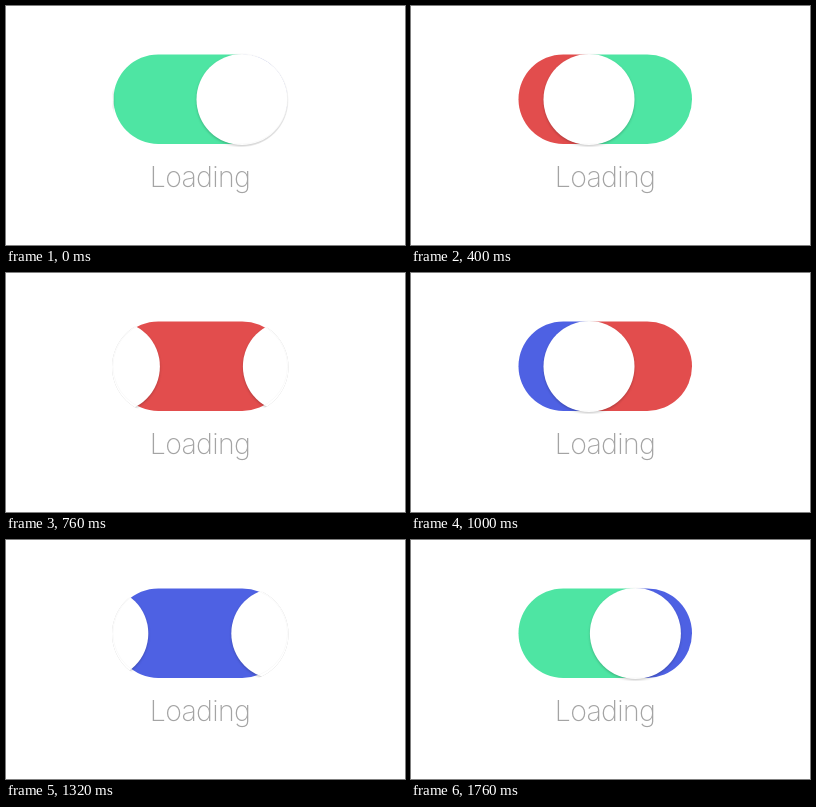
An HTML page with a canvas that plays this animation: 399x239 px, repeating every 1.8 s.

```html
<!DOCTYPE html>
<html lang="en">
<head>
<meta charset="utf-8">
<title>Loading</title>
<style>
  html, body { margin: 0; width: 100%; height: 100%; overflow: hidden; background: #fff; }
  canvas, svg { position: absolute; left: 0; top: 0; width: 399px; height: 239px; }
  text {
    font: 200 28.5px Inter, "Liberation Sans", sans-serif;
    letter-spacing: -0.7px; fill: #a4a4a4; text-anchor: middle;
  }
</style>
</head>
<body>
<canvas id="stage" width="399" height="239"></canvas>
<svg viewBox="0 0 399 239"><text x="194" y="181.4">Loading</text></svg>
<script>
const ctx = document.getElementById('stage').getContext('2d');
const COLORS = ['#4ee5a3', '#e24d4d', '#4e61e3'];
const LOOP = 1800, STEP = 40, TURN = 600, SPACING = 174;
const LEFT = 107.5, WIDTH = 173.5, TOP = 48.4, HEIGHT = 89.5;
const START = 236, KNOB_Y = 93.5, RADIUS = 45.5;

function pill(x, y, w, h) {
  ctx.beginPath();
  ctx.roundRect(x, y, w, h, Math.min(w, h) / 2);
}

function circle(x) {
  ctx.beginPath();
  ctx.arc(x, KNOB_Y, RADIUS, 0, Math.PI * 2);
}

function knob(x) {
  ctx.save();
  ctx.shadowColor = 'rgba(0,0,0,0.22)';
  ctx.shadowBlur = 2.5;
  ctx.shadowOffsetY = 1.3;
  ctx.fillStyle = '#fff';
  circle(x);
  ctx.fill();
  ctx.restore();

  // faint rim of the track where the knob covers it
  ctx.save();
  circle(x);
  ctx.clip();
  pill(LEFT - 0.5, TOP, WIDTH + 1, HEIGHT);
  ctx.strokeStyle = 'rgba(0,0,0,0.025)';
  ctx.stroke();
  ctx.restore();
}

function draw(time) {
  const t = Math.floor((time % LOOP) / STEP) * STEP;
  // each knob parts two colours on a strip sliding to the right
  const turn = Math.floor(t / TURN);
  const lead = START + (t / TURN - turn) * SPACING;

  ctx.clearRect(0, 0, 399, 239);
  ctx.save();
  pill(LEFT, TOP, WIDTH, HEIGHT);
  ctx.clip();
  for (let i = -1; i < 2; i++) {
    ctx.fillStyle = COLORS[(turn + i + 3) % 3];
    ctx.fillRect(lead - (i + 1) * SPACING, TOP - 1, SPACING, HEIGHT + 2);
  }
  ctx.restore();

  ctx.save();
  pill(106, 47, 176.5, 94);
  ctx.clip();
  knob(lead);
  knob(lead - SPACING);
  ctx.restore();
}

const begin = performance.now();
function tick() {
  draw(performance.now() - begin);
  requestAnimationFrame(tick);
}
tick();
</script>
</body>
</html>
```
